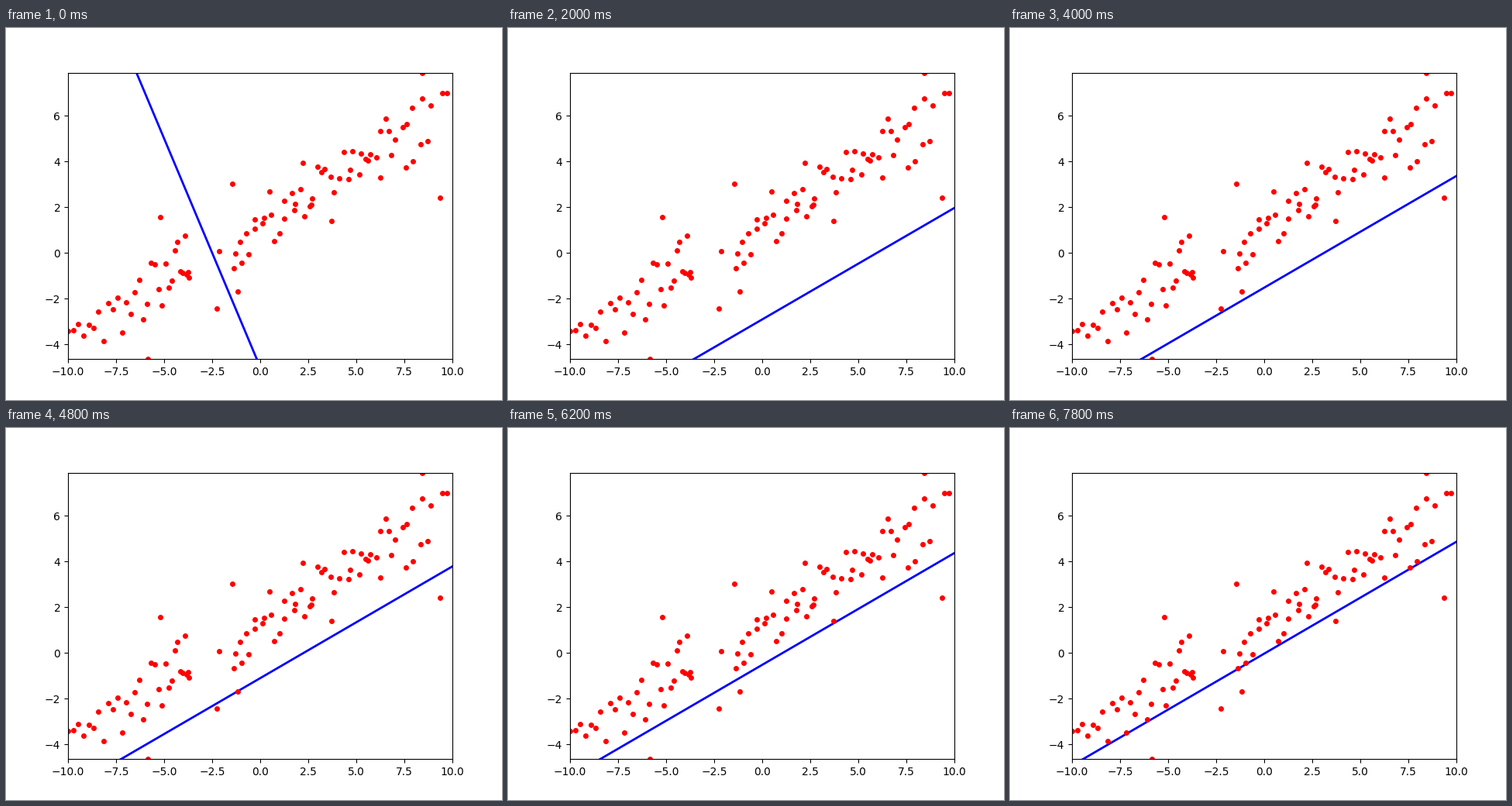
A matplotlib script for the animation above (8 s loop, 640 by 480 pixels).

```python
import numpy as np
import matplotlib.pyplot as plt
from matplotlib.animation import FuncAnimation

STEPS = 40
RATE = 0.02
SLOPE, BIAS = 0.49, 1.235        # best fit of the scatter
MEAN_X, MEAN_XX = -0.017, 31.2   # moments of the scatter
Y_MIN, Y_MAX = -4.645, 7.88

# Outlying dots that shape the cloud; the rest follow the trend with noise.
OUTLIERS = [(-5.85, Y_MIN), (8.43, Y_MAX), (9.35, 2.41), (-1.45, 3.02),
            (-5.2, 1.57), (-2.26, -2.43), (-2.14, 0.07), (-1.17, -1.69),
            (2.22, 3.94), (8.87, 6.44), (9.48, 6.98), (9.72, 6.98)]


def scatter(seed=4):
    """Two groups of dots along the trend, with a gap left of the middle."""
    rng = np.random.default_rng(seed)
    left = -3.7 - 6.3 * np.linspace(0, 1, 33) ** 1.4
    right = np.linspace(-1.5, 8.6, 55) + rng.uniform(-0.15, 0.15, 55)
    x = np.concatenate([left, right])
    y = SLOPE * x + BIAS + rng.triangular(-1.9, 0, 1.9, x.size)
    return np.vstack([np.column_stack([x, y]), OUTLIERS])


def descend(slope, bias):
    """Gradient descent on the mean squared error, one pair per step."""
    path = []
    for _ in range(STEPS):
        path.append((slope, bias))
        da, db = slope - SLOPE, bias - BIAS
        slope -= 2 * RATE * (da * MEAN_XX + db * MEAN_X)
        bias -= 2 * RATE * (da * MEAN_X + db)
    return path


path = descend(-2.0, -5.0)
ends = np.array([-10.0, 10.0])

fig, ax = plt.subplots(figsize=(6.4, 4.8), dpi=100)
ax.set_xlim(-10, 10)
ax.set_ylim(Y_MIN, Y_MAX)
line, = ax.plot([], [], "b-", linewidth=2)
ax.plot(*scatter().T, "ro", markersize=4)


def draw(i):
    slope, bias = path[i]
    line.set_data(ends, slope * ends + bias)
    return line,


anim = FuncAnimation(fig, draw, frames=STEPS, interval=200,
                     repeat=True, repeat_delay=0)
plt.show()
```
